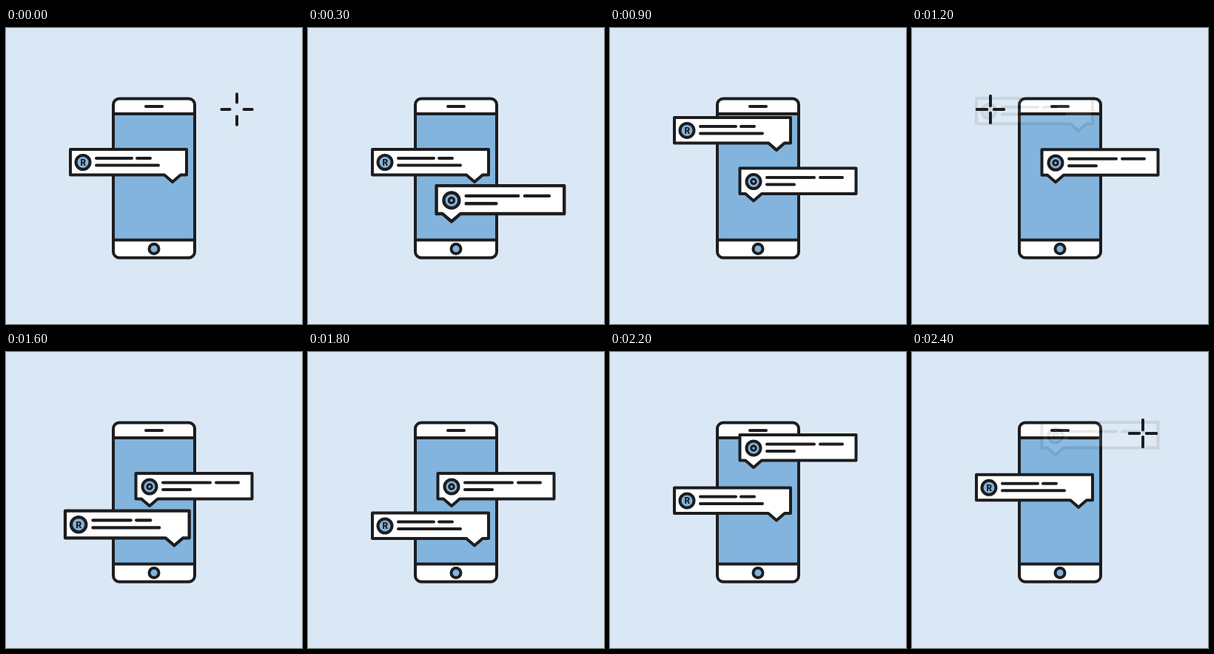
Animation, 400 px wide and 400 px high, one loop 2500 ms. Source, as an HTML page:

```html
<!DOCTYPE html>
<html lang="en">
<head>
<meta charset="utf-8">
<title>Chat bubbles</title>
<style>
  html, body { margin: 0; width: 100%; height: 100%; overflow: hidden; background: #dae8f5; }
  svg { display: block; width: 100vw; height: 100vh; }
  .ink { fill: none; stroke: #1d1d1f; stroke-width: 4; stroke-linecap: round; stroke-linejoin: round; }
  .white { fill: #fff; }
  .blue { fill: #82b4dd; }
  text { font: 800 11.5px Inter, Roboto, sans-serif; fill: #1d1d1f; stroke: none; text-anchor: middle; }
</style>
</head>
<body>
<svg viewBox="0 0 400 400">
  <g class="ink">
    <rect class="white" x="145" y="95.5" width="110" height="215" rx="8"/>
    <path class="blue" d="M145 116H255V286.5H145Z"/>
    <path d="M189 106H211"/>
    <circle class="blue" cx="200" cy="298.5" r="6.5"/>
  </g>
  <!-- Bubbles are drawn with their top edge at y = 0 -->
  <g id="left" class="ink">
    <path class="white" d="M87 0H244V34.5H236L225 44L214 34.5H87Z"/>
    <circle class="blue" cx="104" cy="17.5" r="9.5"/>
    <text x="104.2" y="21.8">R</text>
    <path d="M122 12H170M177 12H195M122 21.5H206"/>
  </g>
  <g id="right" class="ink">
    <path class="white" d="M175.500 0H332.500V34.500H205L194 44L183 34.500H175.500Z"/>
    <circle class="blue" cx="194" cy="18" r="9.5"/>
    <circle cx="194" cy="18" r="3.2" stroke-width="3" style="stroke-width:3"/>
    <path d="M212 12.500H276M284 12.500H314M212 22H249"/>
  </g>
  <path id="sparkLeft" class="ink"/>
  <path id="sparkRight" class="ink"/>
</svg>
<script>
const LOOP = 2500, STEP = 100;
const LOW = 217.5, MID = 164, TOP = 95, TIP = 44;
const get = id => document.getElementById(id);

// birth: pop-in time, burst: fade and sparkle time, pivot: x of the pop
const bubbles = [
  { node: get('left'), spark: get('sparkLeft'), birth: 1250, burst: 1050, pivot: 190, cx: 106 },
  { node: get('right'), spark: get('sparkRight'), birth: 0, burst: 2250, pivot: 195, cx: 312 }
];

const since = (t, start) => (t - start + LOOP) % LOOP;
const progress = (t, from, to) => Math.min(1, Math.max(0, (t - from) / (to - from)));
const sine = u => (1 - Math.cos(Math.PI * u)) / 2;

function popScale(age) {
  return age < 300
    ? 1.1 * Math.sin(progress(age, 50, 300) * Math.PI / 2)
    : 1 + 0.1 * (1 - progress(age, 300, 520)) ** 1.5;
}

function sparkPath(age, cx) {
  const u = age / 450;
  if (u <= 0 || u >= 1) return '';
  const outer = 21 * (1 - (1 - u) ** 5), inner = 21 * u ** 1.35;
  return [[1, 0], [-1, 0], [0, 1], [0, -1]].map(([x, y]) =>
    `M${cx + x * inner} ${110 + y * inner}L${cx + x * outer} ${110 + y * outer}`).join('');
}

function draw(t) {
  for (const b of bubbles) {
    const age = since(t, b.birth), burstAge = since(t, b.burst);
    const scale = popScale(age);
    const y = LOW + (MID - LOW) * sine(progress(age, 550, 1230))
                  + (TOP - MID) * sine(progress(age, 1825, 2385));
    const fade = age > LOOP / 2 ? 1 - progress(burstAge, 0, 165) : 1;
    const fading = age >= since(b.burst, b.birth);
    b.node.setAttribute('transform',
      `translate(${b.pivot} ${y + TIP}) scale(${scale}) translate(${-b.pivot} ${-TIP})`);
    b.node.setAttribute('opacity', scale < 0.01 ? 0 : fading ? fade : 1);
    b.spark.setAttribute('d', sparkPath(burstAge, b.cx));
  }
}

const began = performance.now();
function tick() {
  const t = (performance.now() - began) % LOOP;
  draw(Math.floor(t / STEP) * STEP);
  requestAnimationFrame(tick);
}
tick();
</script>
</body>
</html>
```
